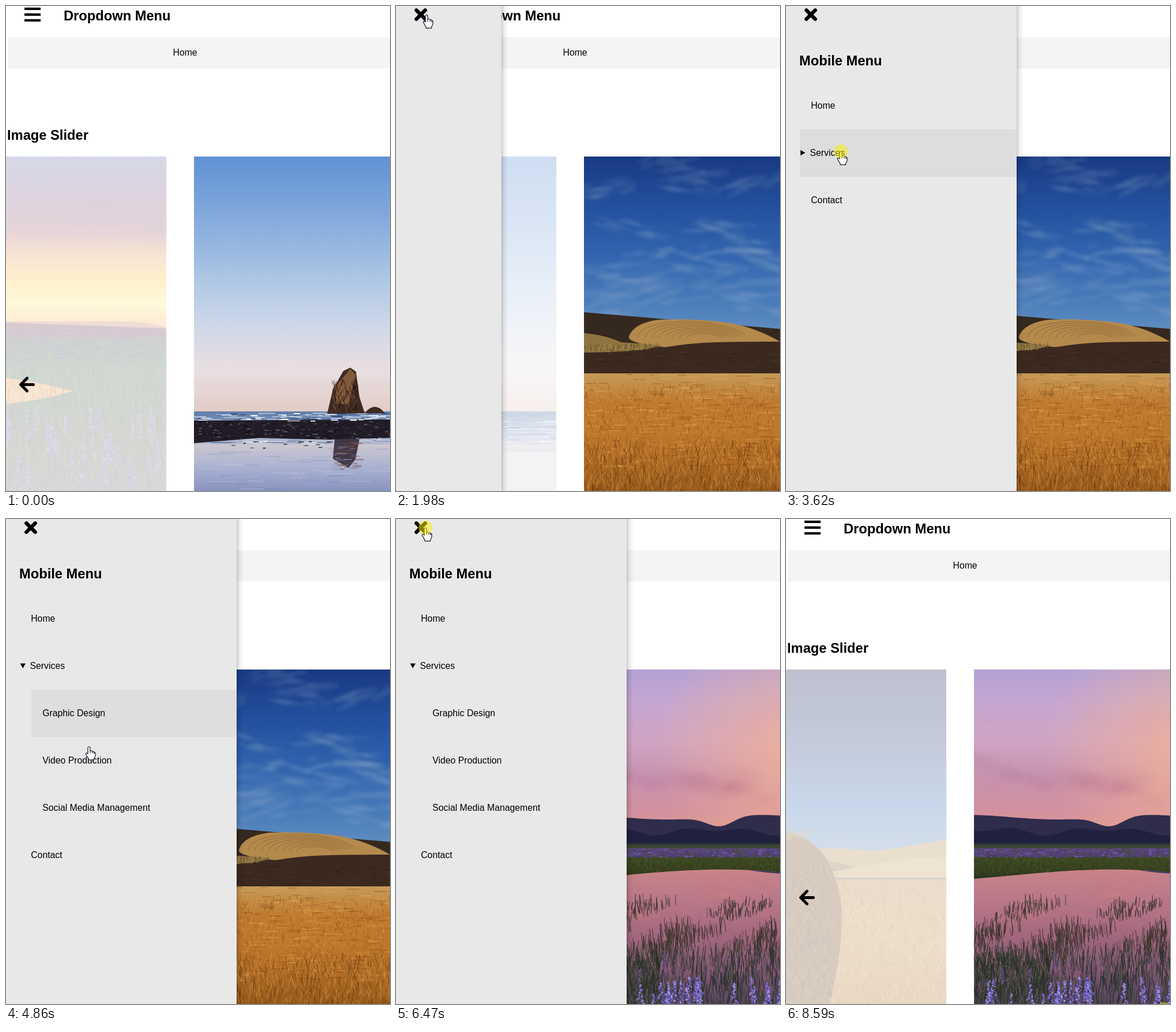
Animation, 666 px wide and 841 px high, one loop 8.66 s. Source, as an HTML page with a canvas:

```html
<!DOCTYPE html>
<html lang="en">
<head>
<meta charset="utf-8">
<title>Dropdown menu and image slider</title>
<style>
  html, body { margin: 0; width: 100%; height: 100%; overflow: hidden; background: #fff; }
  canvas, svg { position: absolute; left: 0; top: 0; width: 666px; height: 841px; }
  text { font: 15.8px "Liberation Sans", Arial, sans-serif; }
  .title { font-weight: bold; font-size: 23.7px; }
  .line { fill: none; stroke: #000; stroke-linecap: round; stroke-linejoin: round; }
  .hidden { display: none; }
</style>
</head>
<body>
<canvas id="slider" width="666" height="841"></canvas>
<svg viewBox="0 0 666 841">
  <defs>
    <linearGradient id="shade">
      <stop offset="0" stop-opacity=".2"/>
      <stop offset=".4" stop-opacity=".07"/>
      <stop offset="1" stop-opacity="0"/>
    </linearGradient>
  </defs>
  <text class="title" x="100" y="24.5">Dropdown Menu</text>
  <rect x="3" y="54" width="663" height="54.5" fill="#f4f4f3"/>
  <text x="289.5" y="86">Home</text>
  <text class="title" x="2" y="232">Image Slider</text>
  <path class="line" d="M28 656.5H47.5M36.5 645.5L25.5 656.5L36.5 667.5" stroke-width="5"/>
  <g id="sidebar">
    <rect width="400" height="841" fill="#e8e8e8"/>
    <rect x="400" width="12" height="841" fill="url(#shade)"/>
    <text class="title" x="23" y="103">Mobile Menu</text>
    <g id="rows"></g>
    <path id="marker" d="M-4 -4.7L4.2 0L-4 4.7Z"/>
  </g>
  <path id="bars" d="M32 4.8H60M32 14.8H60M32 24.8H60" stroke="#000" stroke-width="4.3"/>
  <path id="cross" class="line" d="M35.3 7.3L50.7 22.7M50.7 7.3L35.3 22.7" stroke-width="6.4"/>
  <path id="cursor" fill="#fff" stroke="#14142a" stroke-width="1.2" stroke-linejoin="round"/>
  <circle id="click" r="12" fill="#fff000" fill-opacity=".52"/>
</svg>
<script>
const LOOP = 8660, STEP = 76.6, TOP = 261, BOTTOM = 841, SLIDE_W = 1200, PITCH = 1248, SLOT = 326;
const $ = id => document.getElementById(id);

// ---------- drawing helpers ----------
let seed = 7;
const rnd = (a = 0, b = 1) => {
  seed = (seed * 1664525 + 1013904223) % 4294967296;
  return a + (b - a) * seed / 4294967296;
};
const pick = list => list[Math.floor(rnd(0, list.length))];

// Scenes are drawn in stage coordinates; dx maps them into the slide.
function scene(dx, draw) {
  const canvas = document.createElement('canvas');
  canvas.width = SLIDE_W;
  canvas.height = BOTTOM - TOP;
  const c = canvas.getContext('2d');
  c.translate(dx, -TOP);
  draw(c, -dx, SLIDE_W - dx);
  return canvas;
}
// Horizontal band, colours spread evenly from top to bottom.
function band(c, y0, y1, ...colors) {
  c.fillStyle = c.createLinearGradient(0, y0, 0, y1);
  colors.forEach((color, i) => c.fillStyle.addColorStop(i / (colors.length - 1), color));
  c.fillRect(-1300, y0, 3200, y1 - y0);
}
function shape(c, color, d) {
  c.fillStyle = color;
  c.fill(new Path2D(d));
}
// Ground below the curve y(x).
function ridge(c, color, x0, x1, bottom, y) {
  c.fillStyle = color;
  c.beginPath();
  c.moveTo(x0, bottom);
  for (let x = x0; x <= x1; x += 4) c.lineTo(x, y(x));
  c.lineTo(x1, bottom);
  c.fill();
}
const bump = (x, center, width) => Math.exp(-(((x - center) / width) ** 2));
// gap thins the blades out into clumps: -1 keeps all, higher leaves more holes.
function blades(c, n, x0, x1, y0, y1, length, colors, lean = 2, gap = -1) {
  for (let i = 0; i < n; i++) {
    const x = rnd(x0, x1), y = rnd(y0, y1);
    if (Math.sin(x / 27 + y / 14) < gap) continue;
    c.strokeStyle = pick(colors);
    c.beginPath();
    c.moveTo(x, y);
    c.lineTo(x + rnd(-lean, lean), y - rnd(.4, 1) * length);
    c.stroke();
  }
}
function streaks(c, n, x0, x1, y0, y1, length, colors) {
  for (let i = 0; i < n; i++) {
    c.fillStyle = pick(colors);
    c.fillRect(rnd(x0, x1), rnd(y0, y1), rnd(.3, 1) * length, rnd(.6, 2));
  }
}
function spikes(c, n, x0, x1, y0, y1, height, colors) {
  for (let i = 0; i < n; i++) {
    const x = rnd(x0, x1), y = rnd(y0, y1), h = height * rnd(.6, 1);
    for (let k = 0; k < h; k += 1.6) {
      const w = 1 + 6 * k / h;
      c.fillStyle = pick(colors);
      c.fillRect(x + rnd(-w, w), y + k, rnd(1.5, 4), rnd(1.5, 3.5));
    }
  }
}
// Each cloud is a heap of thin blurred wisps around one centre.
function clouds(c, n, x0, x1, y0, y1, size, color, blur = 3) {
  c.save();
  c.filter = `blur(${blur}px)`;
  c.fillStyle = color;
  for (let i = 0; i < n; i++) {
    const x = rnd(x0, x1), y = rnd(y0, y1), turn = rnd(-.25, .3);
    for (let k = 0; k < 14; k++) {
      const along = rnd(-size, size);
      c.beginPath();
      c.ellipse(x + along, y + along * turn + rnd(-.25, .25) * size, size * rnd(.2, .7), size * rnd(.02, .08), turn + rnd(-.2, .2), 0, 7);
      c.fill();
    }
  }
  c.restore();
}

// ---------- slides ----------
const meadow = scene(922, (c, l, r) => {
  band(c, TOP, 560, '#7680b2', '#86769f', '#98718f', '#ae7382', '#e2a671', '#facd5a', '#ffe884', '#f0b070');
  clouds(c, 10, l, r, 320, 440, 90, 'rgba(150,120,160,.1)', 7);
  ridge(c, '#c98c78', l, r, 580, x => 547 + 11 * bump(x, 290, 40));
  ridge(c, '#7b5068', l, r, 580, x => 549 + x * .036);
  band(c, 574, BOTTOM, '#5f6a66', '#648068', '#6f7a6c', '#777f70', '#7c7f86');
  streaks(c, 2500, l, r, 562, 618, 16, ['rgba(100,75,150,.5)', 'rgba(110,135,100,.4)']);
  shape(c, '#f3ab68', `M${l} 645H0Q60 652 115 668Q60 684 0 690H${l}Z`);
  blades(c, 6000, l, r, 640, 860, 26, ['rgba(80,105,60,.5)', 'rgba(160,150,130,.4)', 'rgba(150,120,130,.4)']);
  spikes(c, 150, l, r, 690, 800, 55, ['#7568b8', '#9a8fd0', '#a08cc0', '#6f78b0']);
});

const beach = scene(-SLOT, (c, l, r) => {
  band(c, TOP, 704, '#6192d4', '#78a2da', '#93b5df', '#b1c9e5', '#cfd8e8', '#e9dfe2', '#e2cbc5');
  band(c, 703, 768, '#5f7dab', '#8fa5c8', '#c6c3d0');
  streaks(c, 500, l, r, 704, 768, 45, ['rgba(255,255,255,.55)', 'rgba(55,85,135,.5)']);
  band(c, 760, BOTTOM, '#cdc7d0', '#a9b2d2', '#8993c0');
  shape(c, '#dbd4d6', `M850 766Q1100 768 ${r} 774V841H700Z`);
  shape(c, '#211c25', 'M326 719L666 717L860 722Q930 735 850 743L560 752L440 749L326 758Z');
  streaks(c, 420, l, 860, 720, 750, 7, ['#3a2f35', '#0e0d14', '#5d5a6a', '#15131b']);
  streaks(c, 110, l, 860, 706, 719, 22, ['#fff', '#dfe6f2', '#34456d']);
  streaks(c, 100, l, 900, 760, 841, 60, ['rgba(200,205,228,.4)', 'rgba(90,105,165,.22)']);
  streaks(c, 14, 380, 560, 754, 766, 10, ['#241a1c']);
  shape(c, '#3f2a22', 'M557 707L567 665L585 633L597 627L607 634L613 678L622 706Q640 684 657 706Z');
  shape(c, '#80583b', 'M573 658L597 629L607 640L594 690L572 690Z');
  blades(c, 150, 566, 609, 655, 704, 12, ['rgba(30,18,16,.7)', 'rgba(155,108,70,.45)'], 5);
  shape(c, 'rgba(45,33,48,.85)', 'M570 751H613L606 786L594 801L567 785Z');
  streaks(c, 50, 562, 604, 754, 802, 18, ['rgba(120,80,65,.6)', 'rgba(150,155,195,.6)']);
});

const wheat = scene(-SLOT, (c, l, r) => {
  band(c, TOP, 600, '#183a82', '#234f9d', '#3164ae', '#4a7dba', '#7099c4');
  clouds(c, 26, l, r, 260, 440, 50, 'rgba(165,188,212,.14)');
  clouds(c, 22, l, r, 430, 530, 65, 'rgba(160,188,215,.13)');
  ridge(c, '#35281f', l, r, 640, x => 531 + (x - l) * .085);
  shape(c, '#b4894c', 'M404 573Q412 550 455 544Q520 541 580 550Q625 558 666 582L470 592Q400 585 404 573Z');
  c.strokeStyle = 'rgba(115,80,35,.55)';
  for (let i = 0; i < 8; i++) {
    c.beginPath();
    c.ellipse(515 + i * 3, 577, 95 - i * 9, 30 - i * 3, .04, 3.1, 6);
    c.stroke();
  }
  shape(c, '#8f7440', 'M326 567Q365 571 390 583L460 588Q430 600 326 601Z');
  blades(c, 180, l, 455, 590, 602, 9, ['rgba(170,140,85,.5)', 'rgba(70,52,25,.5)']);
  ridge(c, '#3b291f', l, r, 640, x => 582 + 20 / (1 + Math.exp((x - 465) / 32)));
  streaks(c, 260, l, r, 600, 635, 22, ['rgba(80,58,42,.35)', 'rgba(30,20,15,.35)']);
  band(c, 637, BOTTOM, '#c79a59', '#bf7a30', '#bd782b', '#b06b25', '#925719');
  streaks(c, 900, l, r, 638, 800, 30, ['rgba(230,175,95,.4)', 'rgba(125,65,15,.35)']);
  blades(c, 4500, l, r, 660, 770, 8, ['rgba(225,160,75,.45)', 'rgba(120,62,14,.45)', 'rgba(195,115,40,.5)']);
  blades(c, 4500, l, r, 765, 860, 17, ['rgba(220,160,80,.5)', 'rgba(85,45,10,.5)', 'rgba(175,100,30,.6)'], 6);
});

const hay = scene(922, (c, l, r) => {
  band(c, TOP, 580, '#28305f', '#344578', '#415f96', '#4d7dbc', '#7094b4');
  ridge(c, '#bb945f', l, r, 640, x => 570 + 5 * bump(x, 150, 50) - 15 * bump(x, 300, 75));
  shape(c, '#9a7448', 'M60 590Q100 596 120 606L75 612Z');
  ridge(c, '#cba46c', 90, r, 640, x => 611 - 25 * Math.sin((x - 90) / 120));
  band(c, 622, 626, '#66665f', '#a58860');
  band(c, 626, BOTTOM, '#bd8f57', '#c39252', '#b37b3a');
  blades(c, 6000, l, r, 640, 860, 10, ['rgba(240,200,130,.45)', 'rgba(135,80,30,.45)'], 5);
  shape(c, '#7d5734', 'M-170 841Q-190 545 -20 541Q50 543 78 605Q98 650 97 695Q95 770 74 841Z');
  blades(c, 2500, -165, 82, 600, 841, 16, ['rgba(60,35,15,.35)', 'rgba(190,135,80,.35)'], 12);
  blades(c, 70, -50, 40, 548, 558, 15, ['#a87c48'], 9);
});

const lake = scene(-SLOT, (c, l, r) => {
  band(c, TOP, 570, '#b3a2d6', '#c6a7d0', '#d0a4c3', '#c793b0', '#d2909f', '#e8a382');
  const glow = c.createRadialGradient(700, 410, 0, 700, 410, 250);
  glow.addColorStop(0, 'rgba(245,180,145,.8)');
  glow.addColorStop(1, 'rgba(245,180,145,0)');
  c.fillStyle = glow;
  c.fillRect(l, TOP, SLIDE_W, 300);
  clouds(c, 10, l, r, 330, 360, 60, 'rgba(240,185,195,.07)', 8);
  clouds(c, 16, l, r, 410, 475, 50, 'rgba(180,115,150,.07)', 6);
  clouds(c, 6, l, r, 440, 500, 18, 'rgba(235,190,205,.12)');
  ridge(c, '#302c4c', l, r, 570, x => 517 + 4 * Math.sin((x - 390) / 50) + 17 * bump(x, 562, 32));
  ridge(c, 'rgba(27,30,58,.75)', l, r, 570, x => 541 + 8 * Math.sin(x / 22) * Math.cos(x / 71));
  band(c, 563, 571, '#2e3b2f', '#3f4a35');
  band(c, 571, 586, '#584881', '#514070');
  band(c, 586, 632, '#3e4a24', '#363f1d', '#232b1a');
  streaks(c, 900, l, r, 571, 587, 8, ['#7257a3', '#473769', '#46502f']);
  blades(c, 1200, l, r, 591, 624, 7, ['#4f592a', '#2a351b', '#424d28']);
  c.save();
  c.beginPath();
  c.moveTo(l, 624);
  c.bezierCurveTo(450, 614, 550, 598, 700, 616);
  c.lineTo(r, 612);
  c.lineTo(r, BOTTOM);
  c.lineTo(l, BOTTOM);
  c.clip();
  band(c, 606, BOTTOM, '#c98488', '#b8778a', '#a2677e', '#865873', '#5a4560');
  shape(c, '#41395e', 'M590 604H760V617Q640 618 590 604Z');
  clouds(c, 14, l, r, 620, 690, 45, 'rgba(225,145,145,.1)', 5);
  c.restore();
  const reeds = ['#2c2d24', '#3d3b2b', '#4b3940', 'rgba(50,48,35,.6)'];
  blades(c, 1300, l, r, 668, 698, 20, reeds, 3, .1);
  blades(c, 2600, l, r, 715, 765, 30, reeds, 4, -.3);
  blades(c, 3200, l, r, 765, 870, 36, ['#252a25', '#3b4733', '#2b2d3b', '#4f4d55'], 5);
  blades(c, 480, l, 460, 765, 850, 30, ['#242b22', '#3d4931', '#313530'], 10);
  spikes(c, 110, l, r, 792, 825, 46, ['#6e5fc0', '#8578d6', '#564b9f', '#a096e4']);
  spikes(c, 8, l, r, 730, 780, 35, ['#575275', '#5e5598']);
});

const slides = [meadow, beach, wheat, hay, lake];

// ---------- timing ----------
// Share of a move done, in equal jumps one STEP apart; the first happens at start.
function progress(t, start, end) {
  if (t < start) return 0;
  const jumps = Math.round((end - start) / STEP) + 1;
  return Math.min(1, (Math.floor((t - start) / STEP + .1) + 1) / jumps);
}

// start, end, x, y: each move begins where the one before ended
const moves = [
  [0, 0, 43, -40],
  [1140, 1440, 53, 15],
  [2610, 3310, 95, 252],
  [3770, 4240, 140, 570],
  [4310, 4620, 150, 304],
  [4700, 5310, 132, 575],
  [5385, 5460, 130, 500],
  [5610, 5700, 135, 361],
  [5780, 6390, 51, 15],
  [6870, 7270, 652, 238],
  [7350, 7350, 720, 630],
  [7500, 7500, 642, 716],
  [7580, 7730, 655, 870],
  [8350, 8350, 655, 818],
  [8430, 8590, 655, 850]
];
const clicks = [1750, 3620, 6470, 8590], CLICK_MS = 155;
const OPENED = 1910, EXPANDED = 3770, CLOSED = 6630, FADE = 350;

function cursorAt(t) {
  const i = moves.findLastIndex(move => move[0] <= t);
  const [start, end, x, y] = moves[Math.max(0, i)], [, , fromX, fromY] = moves[Math.max(0, i - 1)];
  const p = progress(t, start, end);
  return [fromX + (x - fromX) * p, fromY + (y - fromY) * p];
}

// ---------- menu rows ----------
const ROW_H = 82, ROW_TOP = 132;
const rows = [
  { label: 'Home', slot: 0 },
  { label: 'Services', slot: 1, textX: 41.5 },
  { label: 'Graphic Design', slot: 2, nested: true },
  { label: 'Video Production', slot: 3, nested: true },
  { label: 'Social Media Management', slot: 4, nested: true },
  { label: 'Contact', slot: 5, foldedSlot: 2 }
];
function svg(tag, attributes, parent) {
  const node = document.createElementNS('http://www.w3.org/2000/svg', tag);
  for (const name in attributes) node.setAttribute(name, attributes[name]);
  return parent.appendChild(node);
}
for (const row of rows) {
  const x = row.nested ? 44 : 24;
  row.group = svg('g', {}, $('rows'));
  row.back = svg('rect', { x, width: 400 - x, height: ROW_H, fill: '#ddd' }, row.group);
  svg('text', { x: row.textX || x + 19.2, y: 46 }, row.group).textContent = row.label;
}
// Fading highlight: share of the last FADE ms the pointer spent on the row.
function hoverShare(top, t) {
  const samples = 20;
  let inside = 0;
  for (let i = 0; i < samples; i++) {
    const [x, y] = cursorAt(t - i * FADE / samples);
    if (x < 400 && y >= top && y < top + ROW_H) inside++;
  }
  return inside / samples;
}

// ---------- rendering ----------
const ctx = $('slider').getContext('2d');
const show = (node, on) => node.classList.toggle('hidden', !on);
const place = (node, x, y, more = '') => node.setAttribute('transform', `translate(${x} ${y}) ${more}`);
const pointers = {
  hand: 'M-2 1.8Q0 -1 2 1.8V8Q5 6.5 6 9Q8.5 8 9 10.5Q11 9.8 11 12V16Q10.5 19 8.5 21V23.3H-1V21Q-3.5 17.5 -5.5 13.5Q-6 11 -3.5 11.5L-2 13ZM2 8V12M6 9.5V12.5M9 11V13',
  arrow: 'M0 0V16L4 12.5L6.5 18.5L9 17.5L6.5 11.5H11.5Z'
};

function drawSlider(t) {
  const p = progress(t, 440, 900);
  const position = t >= 5610 ? 4 : 1 + p * p * (3 - 2 * p);
  ctx.clearRect(0, 0, 666, 841);
  slides.forEach((slide, i) => {
    const off = i - position;
    ctx.globalAlpha = 1 - .7 * Math.min(1, Math.abs(off));
    ctx.drawImage(slide, Math.round(SLOT + off * PITCH), TOP);
  });
}
function drawMenu(t) {
  const ease = p => p ** 1.13;
  const edge = 400 * (ease(progress(t, OPENED, 2140)) - ease(progress(t, CLOSED, 6720)));
  const expanded = t >= EXPANDED, crossed = t >= OPENED && t < CLOSED;
  show($('sidebar'), edge > 0);
  place($('sidebar'), edge - 400, 0);
  place($('marker'), 29.2, 254.5, `rotate(${expanded ? 90 : 0})`);
  for (const row of rows) {
    const slot = expanded ? row.slot : row.foldedSlot ?? row.slot;
    const top = ROW_TOP + ROW_H * slot;
    show(row.group, expanded || !row.nested);
    place(row.group, 0, top);
    row.back.setAttribute('opacity', hoverShare(top, t));
  }
  show($('cross'), crossed);
  show($('bars'), !crossed);
}
function drawCursor(t) {
  const [x, y] = cursorAt(t);
  const onLink = x < 400 || y > 700;
  $('cursor').setAttribute('d', pointers[onLink ? 'hand' : 'arrow']);
  place($('cursor'), x, y);
  place($('click'), x, y);
  show($('click'), clicks.some(start => t >= start && t < start + CLICK_MS));
}
function frame() {
  const t = performance.now() % LOOP;
  drawSlider(t);
  drawMenu(t);
  drawCursor(t);
  requestAnimationFrame(frame);
}
frame();
</script>
</body>
</html>
```
